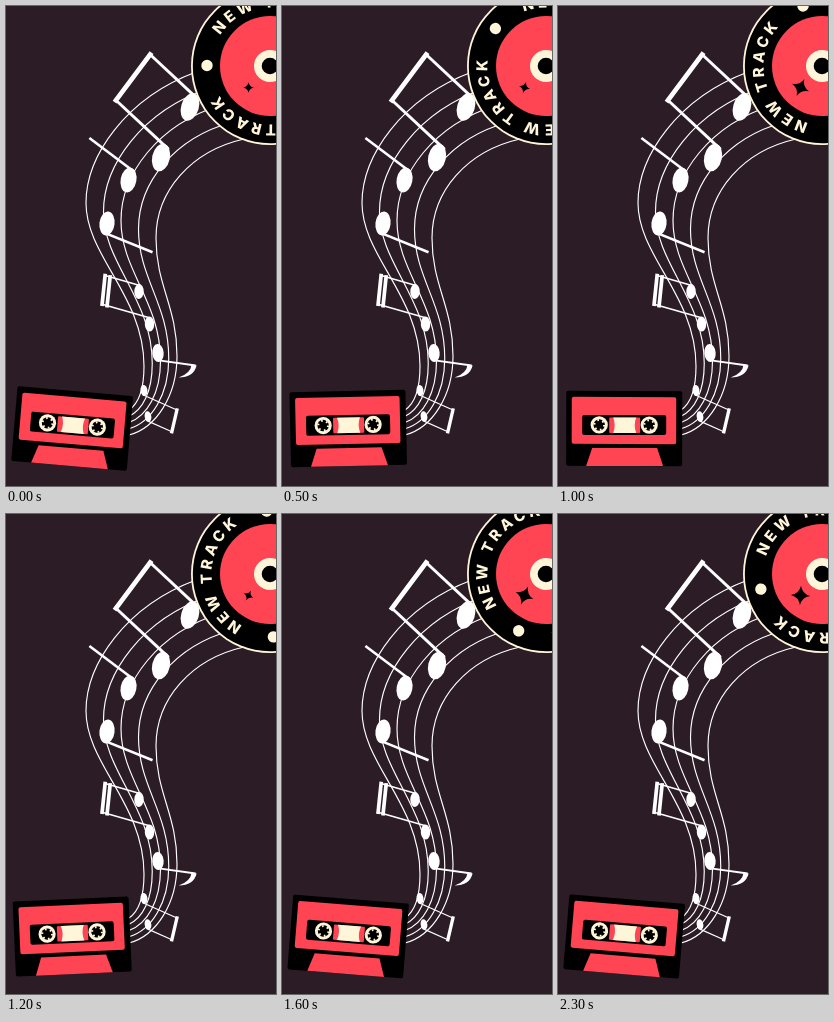
Animation of 270 by 480 pixels, one loop 2.4 s. Source, as an HTML page:

```html
<!DOCTYPE html>
<html lang="en">
<head>
<meta charset="utf-8">
<title>New track</title>
<style>
  html, body { margin: 0; width: 100%; height: 100%; overflow: hidden; background: #2c1c26; }
  svg { display: block; width: 100%; height: 100%; }
  .label { font: 800 15.2px Inter, "Open Sans", sans-serif; letter-spacing: 3.3px; text-anchor: middle; }
  .cream { fill: #fff6da; }
  .red { fill: #ff4453; }
</style>
</head>
<body>
<svg viewBox="0 0 270 480">
  <defs>
    <path id="ring" d="M0 58.5A58.5 58.5 0 0 1 0 -58.5A58.5 58.5 0 0 1 0 58.5"/>
    <g id="arcText" class="cream">
      <text class="label"><textPath href="#ring" startOffset="50.5%">NEW TRACK</textPath></text>
      <circle cx="-63" r="5.7"/>
    </g>
    <g id="reel">
      <circle r="8.6" class="cream"/>
      <circle r="5.7"/>
      <circle r="4.9" fill="none" stroke="#fff6da" stroke-width="2" stroke-dasharray="1.7 3.43"/>
    </g>
  </defs>
  <g id="music" fill="none" stroke="#fff"/>

  <g transform="translate(264 60)">
    <circle r="79" class="cream"/>
    <circle r="77.2"/>
    <g id="spin">
      <use href="#arcText"/>
      <use href="#arcText" transform="rotate(180)"/>
    </g>
    <circle r="50" class="red"/>
    <circle r="16" class="cream"/>
    <circle r="8.3"/>
    <path id="star" d="M0 -10Q1.6 -1.6 10 0Q1.6 1.6 0 10Q-1.6 1.6 -10 0Q-1.6 -1.6 0 -10Z"/>
  </g>

  <g id="cassette">
    <rect x="-58" y="-37" width="116" height="75" rx="2"/>
    <rect x="-52.5" y="-31" width="104.5" height="47" rx="2" class="red"/>
    <rect x="-42" y="-13" width="84" height="20" rx="2"/>
    <rect x="-15" y="-10.5" width="31" height="15.5" rx="1" class="red"/>
    <path d="M-11 -10.5H12Q9 -3 12 5H-11Q-8 -3 -11 -10.5Z" class="cream"/>
    <use href="#reel" x="-25" y="-3"/>
    <use href="#reel" x="25" y="-3"/>
    <path d="M-32 20H33L39 38H-38Z" class="red"/>
  </g>
</svg>
<script>
const LOOP = 2400, STEP = 100;
const byId = id => document.getElementById(id);

function add(tag, attrs) {
  const el = document.createElementNS("http://www.w3.org/2000/svg", tag);
  for (const key in attrs) el.setAttribute(key, attrs[key]);
  byId("music").append(el);
}

const polar = ([x, y], degrees, radius) => {
  const a = degrees * Math.PI / 180;
  return [x + radius * Math.cos(a), y + radius * Math.sin(a)];
};

const stroke = (a, b, width, cap = "butt") =>
  add("path", { d: `M${a}L${b}`, "stroke-width": width, "stroke-linecap": cap });

// Each staff line is an even blend of the outermost and innermost one
function drawStaff() {
  const outer = [190, 66, 120, 92, 80, 150, 80, 197, 80, 250, 138, 290, 138, 360, 138, 385, 132, 398, 123, 404];
  const inner = [238, 133, 185, 145, 150, 185, 150, 232, 150, 280, 171, 300, 171, 350, 171, 390, 150, 422, 123, 429];
  for (let line = 0; line < 5; line++) {
    const [x, y, ...curve] = outer.map((v, i) => v + (inner[i] - v) * line / 4);
    add("path", { d: `M${x} ${y}C${curve}`, "stroke-width": 1.15 });
  }
}

// Draws head and stem, returns the tip of the stem
function note(x, y, size, angle, length) {
  add("ellipse", {
    rx: size * 0.63, ry: size, fill: "#fff", stroke: "none",
    transform: `translate(${x} ${y}) rotate(${26 - 0.088 * y})`
  });
  const root = polar([x, y], angle + 90, size * 0.8);
  const tip = polar(root, angle, length);
  stroke(root, tip, size * 0.21);
  return tip;
}

function beam(a, b, size, angle, count) {
  const width = 2.5 + 0.16 * size;
  for (let i = 0; i < count; i++) {
    const inset = -1.4 * width * i;
    stroke(polar(a, angle, inset), polar(b, angle, inset), width, "square");
  }
}

function drawNotes() {
  beam(note(184, 101, 14, 223, 65), note(155, 151.5, 14, 223, 72), 14, 223, 1);
  note(122.5, 174, 12.5, 217, 56.5);
  note(101, 217.5, 12, 22, 53);
  beam(note(133, 285.5, 7.5, 196, 37), note(143.5, 318, 7.5, 196, 51), 7.5, 196, 2);
  const [x, y] = note(152, 347, 9, 8, 39);
  add("path", { d: `M${x - 4} ${y - 1}l5 1q-3 12 -18 12q12 -4 13 -13Z`, fill: "#fff", stroke: "none" });
  beam(note(138, 384.5, 5.5, 24, 38), note(142, 410.5, 5.3, 24, 28), 5.4, 24, 1);
}

const wave = (t, period, peak) => Math.cos(2 * Math.PI * (t - peak) / period);

function draw(t) {
  byId("spin").setAttribute("transform", `rotate(${0.5 + 0.072 * t})`);
  const size = 0.72 + 0.25 * wave(t, 680, 260);
  const turn = 25 * Math.sin(Math.PI * t / LOOP);
  byId("star").setAttribute("transform", `translate(-21.5 21.5) rotate(${turn}) scale(${size})`);
  const tilt = 1.1 + 3.8 * wave(t, 775, 0);
  byId("cassette").setAttribute("transform", `translate(66.2 422) rotate(${tilt})`);
}

drawStaff();
drawNotes();
const start = performance.now();
function tick() {
  const t = (performance.now() - start) % LOOP;
  draw(Math.floor(t / STEP) * STEP);
  requestAnimationFrame(tick);
}
tick();
</script>
</body>
</html>
```
